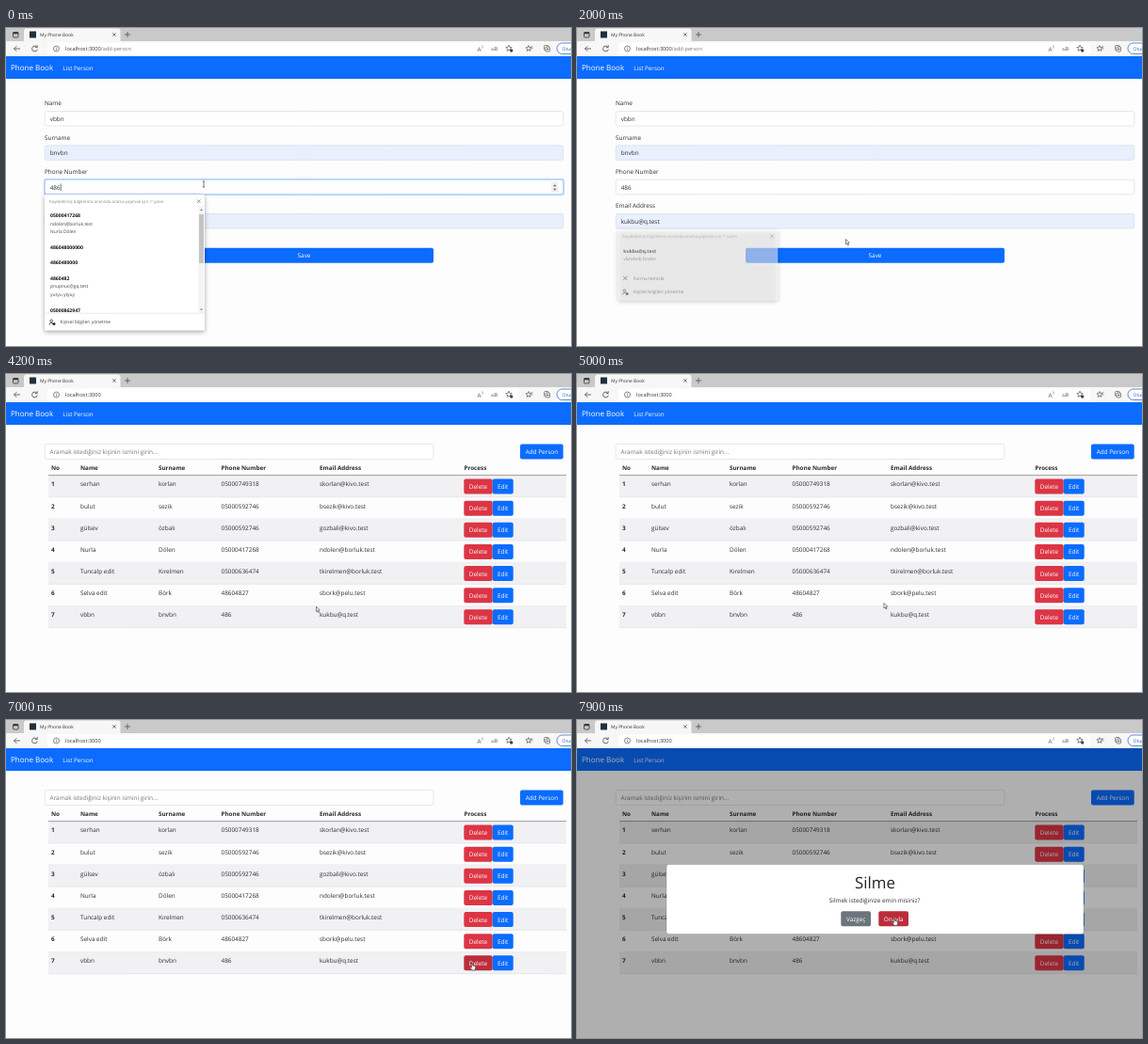
Write an HTML page with a canvas that moves like this. It is 600 px wide and 338 px high and loops after 8000 ms.

```html
<!DOCTYPE html>
<html lang="tr">
<head>
<meta charset="utf-8">
<title>My Phone Book</title>
<style>
html, body { margin: 0; width: 100%; height: 100%; overflow: hidden; background: #fdfdfe; }
canvas { display: block; width: 600px; height: 338px; }
</style>
</head>
<body>
<canvas id="stage"></canvas>
<script>
const LOOP = 8000;
const FONT = '"Open Sans", "Noto Sans", sans-serif';
const BLUE = '#0b6cff', RED = '#dc3545', RED_HOVER = '#bb2d3b', BLUE_HOVER = '#0b5ed7';
const INK = '#2b2f33', PAGE = '#fdfdfe';

const canvas = document.getElementById('stage');
const dpr = window.devicePixelRatio || 1;
canvas.width = 600 * dpr;
canvas.height = 338 * dpr;
const c = canvas.getContext('2d');

const people = [
  ['serhan', 'korlan', '05000749318', 'skorlan@kivo.test'],
  ['bulut', 'sezik', '05000592746', 'bsezik@kivo.test'],
  ['gülsev', 'özbalı', '05000592746', 'gozbali@kivo.test'],
  ['Nurla', 'Dölen', '05000417268', 'ndolen@borluk.test'],
  ['Tuncalp edit', 'Kırelmen', '05000636474', 'tkirelmen@borluk.test'],
  ['Selva edit', 'Börk', '48604827', 'sbork@pelu.test'],
  ['vbbn', 'bnvbn', '486', 'kukbu@q.test']
];
const newcomer = people[6];
const columns = [79, 162, 228.5, 333];

// Moments at which the picture switches
const T = { email: 500, blur: 1900, list: 4000, modal: 7050 };

// Pointer path: time, x, y
const path = [
  [0, 210, 166], [200, 210, 166], [500, 290, 206], [1000, 290, 206],
  [1700, 285.5, 224.5], [2700, 285.5, 224.5], [3050, 306, 256], [3500, 329.5, 247.2],
  [4300, 329.5, 247.2], [4800, 326, 243.5], [5100, 326, 243.5], [5450, 364, 236],
  [5750, 488, 156], [6000, 520, 190], [6300, 495, 258.5], [7300, 495, 258.5],
  [7700, 337, 211], [8000, 337, 211]
];

const clamp = v => Math.max(0, Math.min(1, v));
let mouse = { x: 0, y: 0, kind: 'arrow' };
let active = true;

function pointerAt(t) {
  let i = 1;
  while (i < path.length - 1 && path[i][0] < t) i++;
  const [t0, x0, y0] = path[i - 1], [t1, x1, y1] = path[i];
  const p = clamp((t - t0) / (t1 - t0));
  const e = p * p * (3 - 2 * p);
  return { x: x0 + (x1 - x0) * e, y: y0 + (y1 - y0) * e, kind: 'arrow' };
}

function over(x, y, w, h, kind) {
  const hit = active && mouse.x >= x && mouse.x <= x + w && mouse.y >= y && mouse.y <= y + h;
  if (hit) mouse.kind = kind;
  return hit;
}

// y is the middle of the capitals
function text(s, x, y, size = 6.4, color = INK, weight = 400, align = 'left') {
  c.font = `${weight} ${size}px ${FONT}`;
  c.textAlign = align;
  c.fillStyle = color;
  c.fillText(s, x, y + size * 0.36);
}

function fill(x, y, w, h, color) {
  c.fillStyle = color;
  c.fillRect(x, y, w, h);
}

function box(x, y, w, h, r, color, border, line = 0.6) {
  c.beginPath();
  c.roundRect(x, y, w, h, r);
  if (color) { c.fillStyle = color; c.fill(); }
  if (border) { c.strokeStyle = border; c.lineWidth = line; c.stroke(); }
}

function lines(color, width, ...strokes) {
  c.strokeStyle = color;
  c.lineWidth = width;
  c.beginPath();
  for (const s of strokes)
    for (let i = 0; i < s.length; i += 2) c[i ? 'lineTo' : 'moveTo'](s[i], s[i + 1]);
  c.stroke();
}

function ring(x, y, r, color, width, from = 0, to = Math.PI * 2) {
  c.strokeStyle = color;
  c.lineWidth = width;
  c.beginPath();
  c.arc(x, y, r, from, to);
  c.stroke();
}

function cross(x, y, r, color = '#444', width = 0.7) {
  lines(color, width, [x - r, y - r, x + r, y + r], [x - r, y + r, x + r, y - r]);
}

function triangle(x, y, w, h, color) {
  c.fillStyle = color;
  c.beginPath();
  c.moveTo(x - w, y);
  c.lineTo(x + w, y);
  c.lineTo(x, y + h);
  c.fill();
}

function star(x, y, r) {
  c.beginPath();
  for (let i = 0; i < 10; i++) {
    const a = i * Math.PI / 5 - Math.PI / 2, q = i % 2 ? r * 0.45 : r;
    c.lineTo(x + q * Math.cos(a), y + q * Math.sin(a));
  }
  c.closePath();
  c.strokeStyle = '#555';
  c.lineWidth = 0.7;
  c.stroke();
}

function button(label, x, y, w, h, color, hover) {
  const hot = over(x, y, w, h, 'hand');
  box(x, y, w, h, 2, hot ? hover : color);
  text(label, x + w / 2, y + h / 2 + 0.2, 6.4, '#fff', 400, 'center');
}

function browser(url) {
  fill(0, 0, 600, 14, '#c9c9c9');
  fill(0, 14, 600, 16, '#f7f7f7');
  box(19, 0.5, 102.5, 16, [3, 3, 0, 0], '#f7f7f7');
  box(7.5, 4.5, 5.5, 5.5, 1, null, '#333', 0.8);
  fill(7.5, 4.5, 5.5, 1.8, '#333');
  box(25, 3.5, 7, 7, 0, '#20303a');
  text('My Phone Book', 36, 7, 4.9, '#333');
  cross(115, 7, 1.7);
  lines('#444', 0.7, [126, 7, 132, 7], [129, 4, 129, 10]);

  lines('#444', 0.8, [8.5, 22, 15, 22], [11.3, 19.2, 8.5, 22, 11.3, 24.8]);
  ring(30.5, 22, 2.9, '#444', 0.8, 0.2, 5.5);
  lines('#444', 0.8, [33.2, 18.2, 33.2, 20.6, 30.8, 20.6]);
  box(44, 15.5, 501, 13, 2.5, '#fff');
  ring(53.5, 22, 3, '#555', 0.7);
  lines('#555', 0.7, [53.5, 21.5, 53.5, 23.7], [53.5, 20.1, 53.5, 20.7]);
  const host = 'localhost:3000';
  text(host, 63, 21.7, 5.6, '#333');
  text(url, 63 + c.measureText(host).width, 21.7, 5.6, '#777');

  text('A', 500.5, 22.3, 6.2, '#555');
  ring(504, 20, 2.2, '#555', 0.5, -0.8, 0.8);
  text('aあ', 515, 22, 5, '#555');
  star(534, 21.6, 3.4);
  c.fillStyle = '#444';
  c.beginPath();
  c.arc(536.7, 24, 1.7, 0, 7);
  c.fill();
  star(555, 21.8, 3.2);
  lines('#555', 0.6, [557, 20, 559.5, 20], [557.5, 22, 559.5, 22]);
  box(571.5, 18.5, 4.5, 5, 1, null, '#555', 0.7);
  box(573, 20, 4.5, 5, 1, '#f7f7f7', '#555', 0.7);
  lines('#555', 0.6, [574, 22.5, 576.6, 22.5], [575.3, 21.2, 575.3, 23.8]);
  box(585, 16, 40, 11.5, 5.7, '#fff', '#3a6fc4', 0.8);
  text('Oturum aç', 590.5, 21.8, 5, '#2a60b8');
}

function navbar() {
  fill(0, 30, 600, 24, BLUE);
  text('Phone Book', 5, 42.5, 8, '#fff');
  text('List Person', 60.3, 42.7, 6.3, '#fff');
}

function field(label, value, y, autofill, focus, caret) {
  text(label, 41, y - 8.3);
  if (focus) box(39.9, y - 1.1, 553.2, 18.2, 3, '#bcd7ff');
  box(41.2, y + 0.2, 550.6, 15.6, 2, autofill ? '#e8f0fe' : '#fff', focus ? '#86b7fe' : '#d3d8de');
  text(value, 46.7, y + 8.3);
  if (caret) {
    const x = 47.3 + c.measureText(value).width;
    lines('#222', 0.6, [x, y + 4.5, x, y + 12]);
  }
  over(41, y, 551, 16, 'beam');
}

function personIcon(x, y) {
  ring(x - 0.8, y - 1.4, 1.3, '#333', 0.8);
  ring(x - 0.8, y + 2.8, 2.1, '#333', 0.8, Math.PI, Math.PI * 2);
  c.fillStyle = '#333';
  c.beginPath();
  c.arc(x + 2, y + 1.8, 1.5, 0, 7);
  c.fill();
}

function popup(top, height, dx, dy, alpha, body) {
  c.save();
  c.globalAlpha = alpha;
  c.translate(dx, dy);
  c.shadowColor = 'rgba(0,0,0,.35)';
  c.shadowBlur = 5 * dpr;
  c.shadowOffsetY = 1.5 * dpr;
  box(41, top, 170, height, 1.5, '#fff');
  c.shadowColor = 'transparent';
  text("Kaydedilmiş bilgileriniz arasında arama yapmak için '/' yazın", 46, top + 7.4, 4.4, '#858585');
  cross(204.7, top + 7.2, 1.8, '#555', 0.6);
  body();
  const y = top + height - 8.8;
  personIcon(49, y);
  text('Kişisel bilgileri yönetme', 57.5, y, 4.9, '#444');
  c.restore();
}

function phoneList() {
  const entries = [
    [199.3, '05000417268', 'ndolen@borluk.test', 'Nurla Dölen'],
    [233, '486048000000'], [249.3, '4860480000'],
    [266, '4860482', 'pnupnuc@gq.test', 'yutyu ytyuy'],
    [300, '05000862947']
  ];
  c.save();
  c.beginPath();
  c.rect(41, 189, 170, 113.5);
  c.clip();
  for (const [y, head, ...rest] of entries) {
    text(head, 47, y, 5.1, '#111', 700);
    rest.forEach((s, i) => text(s, 47, y + 8.7 + i * 8.3, 4.9, '#444'));
  }
  c.restore();
  fill(204.5, 189, 6, 114, '#f4f4f4');
  fill(205, 198, 5, 52, '#c4c4c4');
  triangle(207.5, 194, 1.5, -1.8, '#777');
  triangle(207.5, 298.5, 1.5, 1.8, '#777');
  lines('#ddd', 0.6, [41, 303.2, 211, 303.2]);
}

function emailList() {
  text(newcomer[3], 47, 236.6, 5, '#111', 700);
  text('vbnvbnb bnvbn', 47, 244.9, 4.8, '#555');
  lines('#ddd', 0.6, [41, 255.2, 211, 255.2]);
  cross(49, 265, 2.3, '#333', 0.8);
  text('Formu temizle', 57.5, 265, 4.9, '#444');
}

function formPage(t) {
  const onPhone = t < T.email, onEmail = !onPhone && t < T.blur;
  field('Name', newcomer[0], 88.3);
  field('Surname', newcomer[1], 124.6, true);
  field('Phone Number', newcomer[2], 161, false, onPhone, onPhone);
  const blink = (t - T.email) % 1000 < 500;
  field('Email Address', newcomer[3], 197.3, true, onEmail, onEmail && blink);
  if (onPhone) {
    box(579, 163.5, 7.5, 11.5, 1, '#efefef');
    triangle(582.8, 168.2, 1.6, -2, '#555');
    triangle(582.8, 170.7, 1.6, 2, '#555');
  }
  button('Save', 179, 233.8, 275, 16, BLUE, BLUE);

  // A closing list slides away while it fades
  const p1 = clamp((t - T.email) / 220), p2 = clamp((t - T.blur) / 220);
  if (p1 < 1) popup(177, 144.5, 4.5 * p1, 8 * p1 * p1, 1 - p1, phoneList);
  if (!onPhone && p2 < 1) popup(213.3, 75.3, 5 * p2, 4 * p2 * p2, 1 - p2, emailList);
}

function listPage() {
  box(41.2, 74.5, 412.6, 16, 2, '#fff', '#d3d8de');
  text('Aramak istediğiniz kişinin ismini girin...', 46.6, 83, 6.4, '#6c757d');
  button('Add Person', 546, 74.5, 45.7, 16, BLUE, BLUE_HOVER);
  text('No', 48, 99.5, 6.3, INK, 700);
  ['Name', 'Surname', 'Phone Number', 'Email Address'].forEach((s, i) =>
    text(s, columns[i], 99.5, 6.3, INK, 700));
  text('Process', 486.5, 99.5, 6.3, INK, 700);
  people.forEach((person, i) => {
    const y = 107.8 + i * 23.13;
    if (i % 2 === 0) fill(45, y, 550, 23.13, '#f1f0f2');
    lines('#dcdfe3', 0.6, [45, y + 23.1, 595, y + 23.1]);
    text(i + 1, 48, y + 9.3, 6.4, INK, 700);
    person.forEach((s, k) => text(s, columns[k], y + 9.3));
    button('Delete', 486.3, y + 3.7, 30.4, 16, RED, RED_HOVER);
    button('Edit', 516.7, y + 3.7, 22, 16, BLUE, BLUE_HOVER);
  });
  lines('#777', 0.7, [45, 107.6, 595, 107.6]);
}

function modal(age) {
  const dim = clamp(age / 150);
  fill(0, 30, 600, 308, `rgba(0,0,0,${0.31 * dim})`);
  const p = clamp((age - 50) / 300), e = 1 - (1 - p) * (1 - p);
  c.save();
  c.globalAlpha = e;
  c.translate(0, -20 * (1 - e));
  box(95, 153.6, 443, 74, 2.5, '#fff', 'rgba(0,0,0,.3)', 0.5);
  text('Silme', 316.5, 173.3, 16.9, '#212529', 500, 'center');
  text('Silmek istediğinize emin misiniz?', 316, 191.2, 6.4, INK, 400, 'center');
  button('Vazgeç', 280.3, 203.2, 31.7, 16, '#6c757d', '#5c636a');
  button('Onayla', 320.3, 203.2, 31.7, 16, RED, RED_HOVER);
  c.restore();
}

function shape(points, x, y) {
  c.beginPath();
  for (let i = 0; i < points.length; i += 2) c.lineTo(x + points[i], y + points[i + 1]);
  c.closePath();
  c.fillStyle = '#fff';
  c.fill();
  c.strokeStyle = '#333';
  c.lineWidth = 0.6;
  c.stroke();
}

function pointer({ x, y, kind }) {
  c.lineJoin = 'round';
  if (kind === 'beam') {
    lines('#444', 0.7, [x, y - 3, x, y + 3], [x - 1.2, y - 3, x + 1.2, y - 3], [x - 1.2, y + 3, x + 1.2, y + 3]);
  } else if (kind === 'hand') {
    shape([-0.6, 0, 0.5, 0, 0.6, 2.5, 3.4, 3.2, 3.7, 4.2, 3, 7.4, 0, 7.4, -2.3, 4.4, -1.7, 3.9, -0.6, 4.7], x, y);
  } else {
    shape([0, 0, 0, 5.4, 1.2, 4.4, 2.1, 6.4, 3, 6, 2.1, 4, 3.7, 3.8], x, y);
  }
}

function draw(t) {
  c.setTransform(dpr, 0, 0, dpr, 0, 0);
  c.textRendering = 'geometricPrecision';
  mouse = pointerAt(t);
  active = t < T.modal;
  fill(0, 0, 600, 338, PAGE);
  const onForm = t < T.list;
  browser(onForm ? '/add-person' : '');
  navbar();
  if (onForm) formPage(t); else listPage();
  if (!active) {
    active = true;
    modal(t - T.modal);
  }
  pointer(mouse);
}

const start = performance.now();
function tick() {
  draw((performance.now() - start) % LOOP);
  requestAnimationFrame(tick);
}
tick();
</script>
</body>
</html>
```
